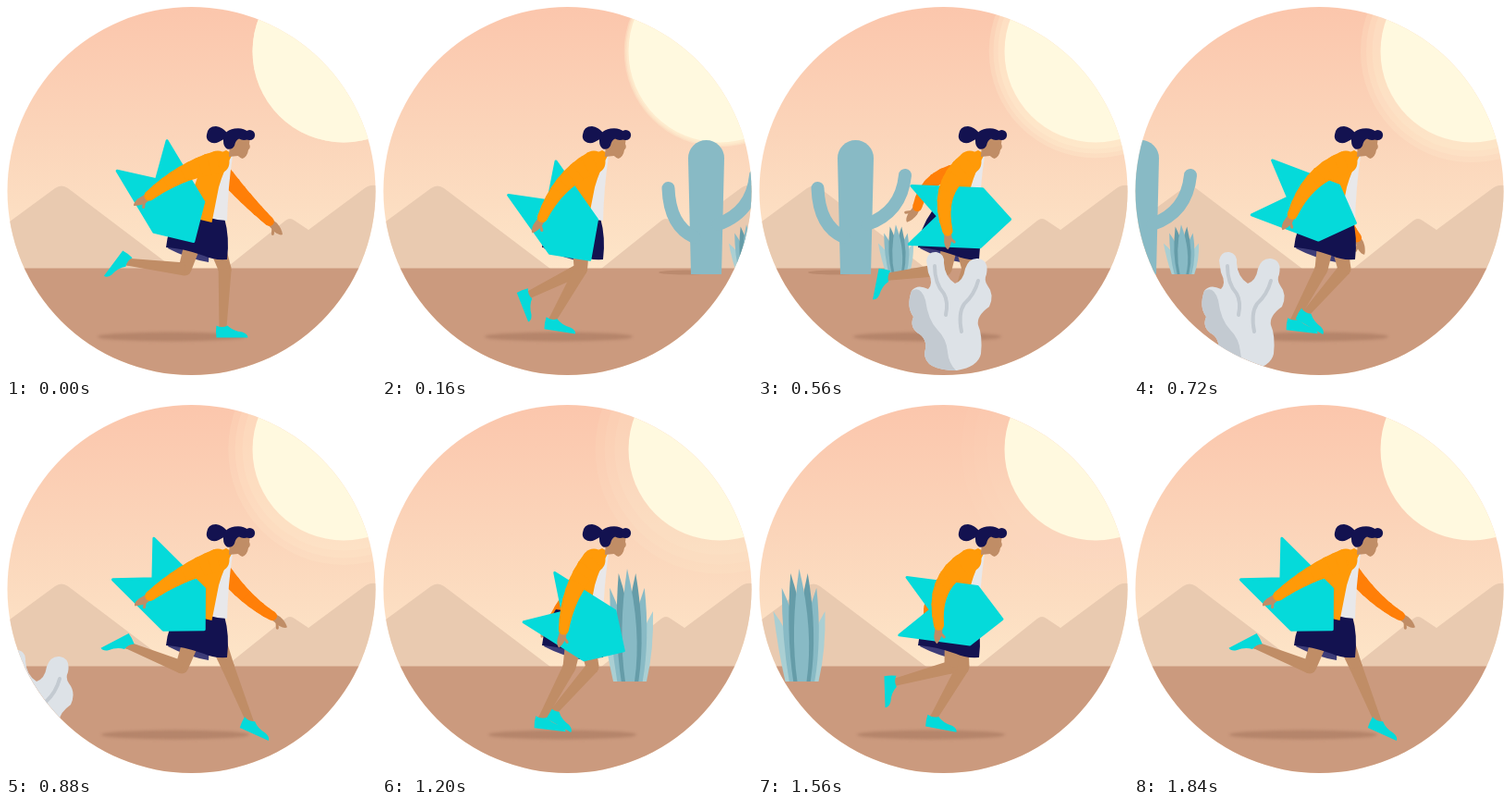
An HTML page with a canvas for the animation above (1.88 s loop, 400 by 400 pixels).

```html
<!DOCTYPE html>
<html lang="en">
<head>
<meta charset="utf-8">
<title>Desert run</title>
<style>
html, body { margin: 0; width: 100%; height: 100%; overflow: hidden; background: #fff; }
canvas { display: block; width: 100vw; height: 100vh; }
</style>
</head>
<body>
<canvas id="stage"></canvas>
<script>
const LOOP = 1880, STRIDE = 960, STEP = 40, RAD = Math.PI / 180;
const SKIN = '#c08d66', NAVY = '#131250', LINING = '#3d3c78', TEAL = '#05dada';
const ORANGE = '#ff9a08', DEEP = '#ff7f08', CACTUS = '#88bac5', DARK = '#659ca8', PALE = '#aacfd3';
const CORAL = '#dde2e7', VEIN = '#c3cad1';

const canvas = document.getElementById('stage');
const ctx = canvas.getContext('2d');
const scale = window.devicePixelRatio || 1;
canvas.width = canvas.height = 400 * scale;

// Swing over one stride; lag in degrees, twice adds a double-speed wobble.
function wave(t, mid, amp, lag, twice = 0) {
  const a = t / STRIDE * 360;
  return mid + amp * Math.cos((a - lag) * RAD) + twice * Math.sin(2 * a * RAD);
}

// Shin angle through the stride: plant, push off, kick, swing, reach.
const SHIN = [[0, 92], [120, 120], [240, 118], [320, 146], [400, 202], [600, 165], [720, 131], [800, 125], [880, 68], [960, 92]];

function shinAngle(t) {
  const p = (t + STRIDE) % STRIDE;
  const i = SHIN.findIndex(([time]) => time > p);
  const [t0, a] = SHIN[i - 1], [t1, b] = SHIN[i];
  return a + (b - a) * (p - t0) / (t1 - t0);
}

function step([x, y], angle, length) {
  return [x + Math.cos(angle * RAD) * length, y + Math.sin(angle * RAD) * length];
}

function fill(d, colour) {
  ctx.fillStyle = colour;
  ctx.fill(new Path2D(d));
}

function line(d, colour, width) {
  ctx.strokeStyle = colour;
  ctx.lineWidth = width;
  ctx.lineCap = ctx.lineJoin = 'round';
  ctx.stroke(new Path2D(d));
}

function ellipse(x, y, rx, ry, colour) {
  ctx.fillStyle = colour;
  ctx.beginPath();
  ctx.ellipse(x, y, rx, ry, 0, 0, 7);
  ctx.fill();
}

function placed([x, y], degrees, draw) {
  ctx.save();
  ctx.translate(x, y);
  ctx.rotate(degrees * RAD);
  draw();
  ctx.restore();
}

// Tapered limb through points [x, y, width].
function limb(points, colour) {
  points.forEach(([x, y, w]) => ellipse(x, y, w / 2, w / 2, colour));
  for (let i = 1; i < points.length; i++) {
    const [x, y, w] = points[i - 1], [X, Y, W] = points[i];
    const a = Math.atan2(Y - y, X - x), s = -Math.sin(a) / 2, c = Math.cos(a) / 2;
    ctx.beginPath();
    ctx.moveTo(x + s * w, y + c * w);
    ctx.lineTo(X + s * W, Y + c * W);
    ctx.lineTo(X - s * W, Y - c * W);
    ctx.lineTo(x - s * w, y - c * w);
    ctx.fill();
  }
}

// Sleeve bent smoothly through the elbow.
function sleeve(shoulder, elbow, wrist, wide, thin, colour) {
  const points = [];
  for (let u = 0; u <= 1; u += 0.125) {
    const v = 1 - u, bend = 2 * u * v;
    const at = k => (v * v - bend / 2) * shoulder[k] + 2 * bend * elbow[k] + (u * u - bend / 2) * wrist[k];
    points.push([at(0), at(1), wide + (thin - wide) * u]);
  }
  limb(points, colour);
}

function backdrop(t) {
  const sky = ctx.createLinearGradient(0, 0, 0, 284);
  sky.addColorStop(0, '#fbc6ac');
  sky.addColorStop(0.5, '#fbd5ba');
  sky.addColorStop(1, '#fde5c8');
  ctx.fillStyle = sky;
  ctx.fillRect(0, 0, 400, 400);

  // Halo rings widen and fade over the loop.
  ctx.globalAlpha = 0.32 * Math.max(0, 1 - t / 1700) ** 1.3;
  for (const part of [1, 0.72, 0.42]) {
    const r = 98.5 + t * 0.03 * part;
    ellipse(365, 49, r, r, '#fff6d8');
  }
  ctx.globalAlpha = 1;
  ellipse(365, 49, 98.5, 98.5, '#fff9df');

  fill('M0 236L53 197Q60 192 67 197L182 284H0Z', '#e9cab0');
  fill('M237 284L302 232Q307 228 312 232L327 242L385 199Q392 193 400 194V284Z', '#e9cab0');
  fill('M0 283.5H400V400H0Z', '#cb9a7e');
}

// Fan of leaves, outermost first.
function agave(x, y, sx, sy) {
  ctx.save();
  ctx.translate(x, y);
  ctx.scale(sx, sy);
  [-1, 1, -0.67, 0.67, -0.33, 0.33, 0].forEach((u, i) => {
    const b = u * 13, h = 122 - 46 * u * u, tip = u * 28 - 3;
    fill(`M${b - 5} 0Q${b - 13} ${-h * 0.45} ${tip} ${-h}Q${b + 13} ${-h * 0.45} ${b + 5} 0Z`,
      [PALE, CACTUS, DARK, CACTUS][i >> 1]);
  });
  ctx.restore();
}

function cactus() {
  ellipse(84, 288, 30, 2.5, 'rgba(150,100,75,.3)');
  fill('M86 164.5A19.5 19.5 0 0 1 125 164.5L122 290H89Z', CACTUS);
  line('M64.5 197Q66 238 93 250', CACTUS, 14);
  line('M159 183Q155 223 118 236', CACTUS, 14);
}

function coral() {
  fill('M182 275Q184 265 193 266Q202 268 201 278Q202 293 213 300Q222 297 224 284Q228 272 238 273Q250 275 247 290' +
    'Q244 296 248 302Q256 312 250 325Q236 335 238 345Q243 356 241 376Q238 390 215 394Q180 394 180 375' +
    'Q184 362 175 355Q163 348 168 336Q160 325 166 308Q172 300 184 306Q190 300 184 288Z', CORAL);
  fill('M166 308Q176 302 181 318Q184 340 194 350Q204 360 205 374Q206 386 214 394Q180 394 180 375' +
    'Q184 362 175 355Q163 348 168 336Q160 325 166 308Z', VEIN);
  line('M191 281Q191 300 201 311Q206 320 203 334', VEIN, 4);
  line('M238 297Q234 312 223 322Q216 332 220 352', VEIN, 4);
}

function leg(t) {
  const kneeX = wave(t, 215, 25, -30), kneeY = 284.5;
  const shin = shinAngle(t);
  const ankle = step([kneeX, kneeY], shin, 63);
  const foot = 1.73 * Math.max(0, shin - 114) + Math.max(0, 92 - shin);
  limb([[214 + (kneeX - 214) * 0.6, 258, 18], [kneeX, kneeY, 14], [...ankle, 8]], SKIN);
  placed(ankle, foot, () => fill('M-7 -2Q-1 1 5 -2Q11 4 21 5Q27 7 27 11H-7Q-8 5 -7 -2Z', TEAL));
}

function arm(shoulder, upper, lower, lengths, widths, colour, thumb) {
  const elbow = step(shoulder, upper, lengths[0]);
  const wrist = step(elbow, lower, lengths[1]);
  return {
    wrist,
    draw() {
      placed(wrist, lower, () => {
        fill('M-3 -3.5L7 -4.5Q15 -4 20 0Q19 3 12 4L-3 3.5Z', SKIN);
        line(`M6 0L12 ${7 * thumb}`, SKIN, 3);
      });
      sleeve(shoulder, elbow, wrist, ...widths, colour);
    }
  };
}

// The board hangs from the near hand.
function board(t, hand) {
  placed(hand, wave(t, 26.5, 33, 10, 8), () => {
    ctx.translate(-42, -15.5);
    const d = 'M1 -31.5L78 -31.5L109 0L78 31.5L1 31.5L31 0Z';
    fill(d, TEAL);
    line(d, TEAL, 3);
  });
}

function head() {
  fill('M242 146L252 146L251 162L241 163Z', SKIN);
  fill('M247 142H264L263 149Q265 153 262 155.5Q261 163 255.5 165Q250 163 246 155Z', SKIN);
  fill('M217 139Q218 130 227 130Q234 131 239 137L240 143Q234 144 230 147Q224 150 219 146Q216 143 217 139Z', NAVY);
  fill('M235 146Q234 135 247 132.5Q256 131 262 136L262 144Q256 146 252 143.5Q248 145 247 151Q244 156 239 154.5Q235 152 235 146Z', NAVY);
  ellipse(263.5, 139.5, 5.6, 5.6, NAVY);
}

function runner(t) {
  ctx.filter = 'blur(1.5px)';
  ellipse(187 - 8 * Math.cos(4 * Math.PI * t / STRIDE), 357.5, 80, 5, 'rgba(160,112,88,.5)');
  ctx.filter = 'none';

  const far = arm([232, 177], wave(t, 116, -70, -15), wave(t, 95, -58, -30), [41, 36], [18, 10], DEEP, 1);
  const lower = wave(t, 113.5, 35, -15);
  const near = arm([229, 169], lower + wave(t, 23, 10, 205, 8), lower, [40, 43], [25, 11], ORANGE, -1);

  far.draw();
  fill('M180 254L220 258L219 277Q196 273 175 262Z', LINING);
  leg(t - STRIDE / 2);
  leg(t);
  fill('M188 222L236 229Q242 250 239 274Q224 275 214 270Q192 262 173 261Q175 240 188 222Z', NAVY);
  fill('M237 160L245 162Q240 195 239 232Q230 232 220 229Z', '#e8e8ea');
  fill('M238 156L245 160Q235 178 230 196L222.5 234L210 231L204 194Q212 166 238 156Z', ORANGE);
  head();
  board(t, near.wrist);
  near.draw();
}

function draw(t) {
  ctx.setTransform(scale, 0, 0, scale, 0, 0);
  ctx.fillStyle = '#fff';
  ctx.fillRect(0, 0, 400, 400);
  ctx.save();
  ctx.beginPath();
  ctx.arc(200.5, 200, 199, 0, 7);
  ctx.clip();
  backdrop(t);

  const shift = (560 - t) * 0.6125;
  placed([shift, 0], 0, cactus);
  agave(151 + shift, 290, 0.68, 0.44);
  agave(660 + shift, 300, 1, 1);
  runner(t);
  placed([(560 - t) * 0.5625, 0], 0, coral);
  ctx.restore();
}

const start = performance.now();
function tick() {
  const t = (performance.now() - start) % LOOP;
  draw(Math.floor(t / STEP) * STEP);
  requestAnimationFrame(tick);
}
tick();
</script>
</body>
</html>
```
